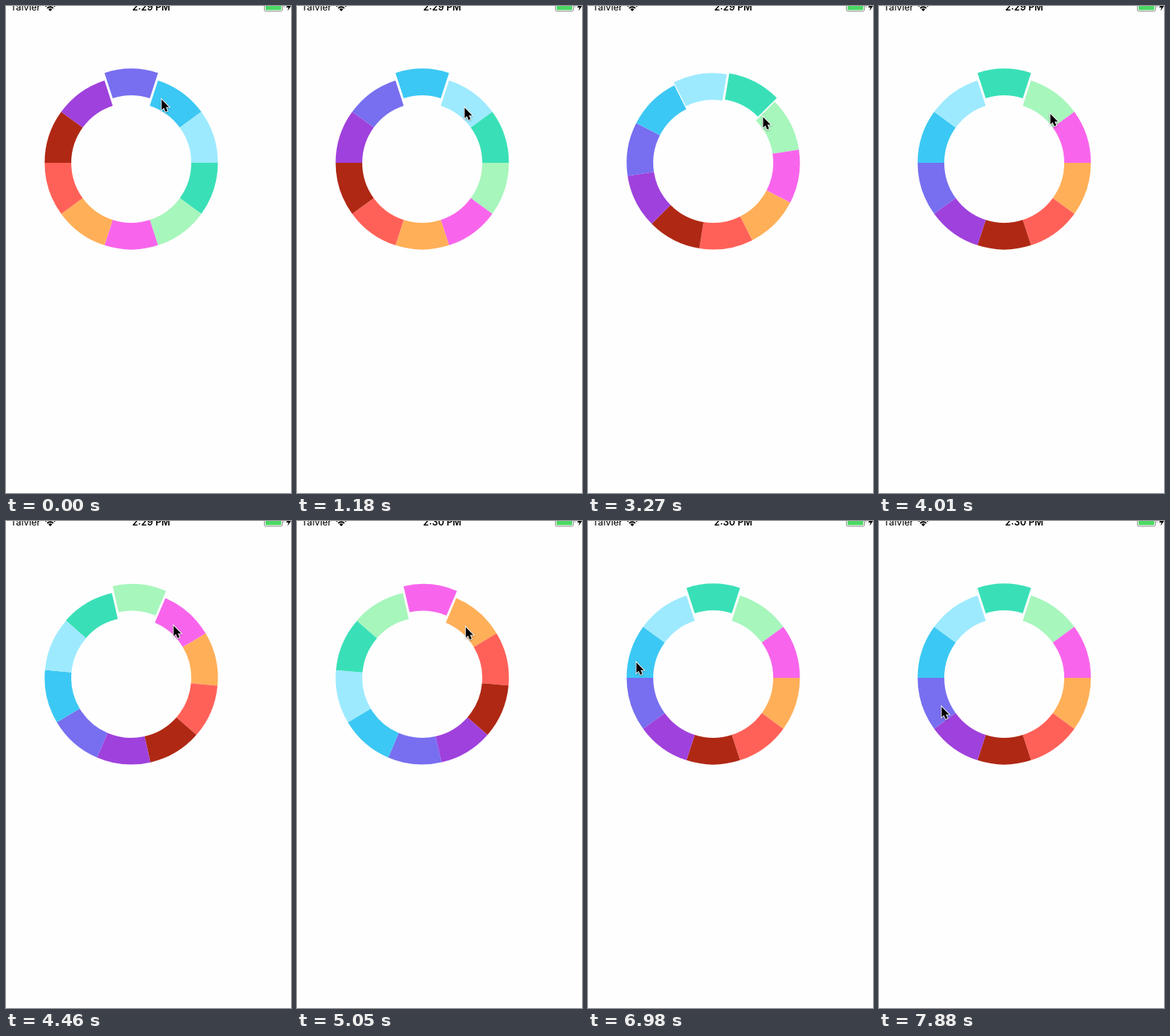
An HTML page for the animation above (8000 ms loop, 380 by 649 pixels).

```html
<!DOCTYPE html>
<html lang="en">
<head>
<meta charset="utf-8">
<title>Ring selector</title>
<style>
html, body { margin: 0; height: 100%; overflow: hidden; background: #fefefe; }
svg { display: block; width: 100vw; height: 100vh; }
text { font: 12.7px Inter, "Liberation Sans", sans-serif; fill: #000; }
#clock { font-weight: 600; font-size: 12.6px; text-anchor: middle; }
#cursor { filter: drop-shadow(0 1px 1px rgba(0, 0, 0, .3)); }
</style>
</head>
<body>
<svg viewBox="0 0 380 649">
  <text x="6" y="6">Talvier</text>
  <g transform="translate(59 7)" fill="none" stroke="#000" stroke-width="2">
    <path d="M-2.5 -2.5A3.6 3.6 0 0 1 2.5 -2.5L0 0Z" fill="#000" stroke="none"/>
    <path d="M-4 -4A5.7 5.7 0 0 1 4 -4M-6.5 -6.5A9.2 9.2 0 0 1 6.5 -6.5"/>
  </g>
  <text id="clock" x="193.6" y="6"></text>
  <rect x="344.5" y="-4.5" width="24" height="11.5" rx="2" fill="none" stroke="#8a8a8a"/>
  <rect x="346" y="-3" width="21" height="8.5" rx="1" fill="#4cd964"/>
  <path d="M370 -1q1.6 2 0 4z" fill="#8a8a8a"/>
  <path d="M378 -5L373.5 2H376.6L375.5 6.5L380 0H377.5Z"/>
  <g id="ring"></g>
  <path id="cursor" d="M0 0V14L3.1 11.2L5.3 16.4L7.9 15.3L5.7 10.2H10Z"
    stroke="#fff" stroke-width="1.8" paint-order="stroke"/>
</svg>
<script>
const LOOP = 8000, STEP = 148.6, TURN = 250, POP = 10;
const OUTER = 115.5, INNER = 80, SLICE = 36;
const colors = ['#776ff0', '#3cc8f4', '#9deaff', '#39e0b7', '#a7f6bc',
  '#f865ec', '#ffaf58', '#ff6158', '#af2814', '#9f41dc'];

// Taps: [ms, slice brought to the top]
const taps = [[465, 1], [1361, 2], [3184, 3], [4274, 4], [4868, 5], [6680, 3]];

// Pointer stops: [step, x, y]
const stops = [[0, 207, 124], [2, 217, 131], [6, 217, 131], [8, 223, 135],
  [12, 223, 135], [19, 233, 147.5], [26, 233, 147.5], [28, 223, 139],
  [30, 223, 139], [32, 224.5, 141], [34, 224.5, 141], [42, 64, 189],
  [43, 64, 188], [51, 64, 188], [53, 83, 247]];

const $ = id => document.getElementById(id);
const clamp = v => Math.min(1, Math.max(0, v));
const mix = (a, b, k) => a + (b - a) * k;

function bezier(x1, y1, x2, y2) {
  const at = (a, b, s) => 3 * a * s * (1 - s) ** 2 + 3 * b * s * s * (1 - s) + s ** 3;
  return x => {
    let lo = 0, hi = 1;
    for (let i = 0; i < 24; i++) {
      const mid = (lo + hi) / 2;
      if (at(x1, x2, mid) < x) lo = mid; else hi = mid;
    }
    return at(y1, y2, hi);
  };
}
const turnEase = bezier(.42, 0, .58, 1);
const popEase = bezier(.25, .1, .25, 1);

const sin = Math.sin(Math.PI / 10), cos = Math.cos(Math.PI / 10);
const point = (r, side) => `${side * r * sin} ${-r * cos}`;
const shape = `M${point(OUTER, -1)}A${OUTER} ${OUTER} 0 0 1 ${point(OUTER, 1)}` +
  `L${point(INNER, 1)}A${INNER} ${INNER} 0 0 0 ${point(INNER, -1)}Z`;

const slices = colors.map(fill => {
  const path = document.createElementNS('http://www.w3.org/2000/svg', 'path');
  path.setAttribute('d', shape);
  path.setAttribute('fill', fill);
  return $('ring').appendChild(path);
});

function drawRing(ms) {
  let from = 0, to = 0, start = -TURN;
  for (const [time, slice] of taps) {
    if (ms >= time) [from, to, start] = [to, slice, time];
  }
  const k = clamp((ms - start) / TURN);
  const top = mix(from, to, turnEase(k)), out = popEase(k);
  $('ring').setAttribute('transform', `translate(167 209) rotate(${-SLICE * top})`);
  slices.forEach((path, i) => {
    const pop = i === to ? out : i === from ? 1 - out : 0;
    path.setAttribute('transform', `rotate(${SLICE * i}) translate(0 ${-POP * pop})`);
  });
}

function drawCursor(step) {
  const next = Math.max(1, stops.findIndex(s => s[0] >= step));
  const [a, ax, ay] = stops[next - 1], [b, bx, by] = stops[next];
  const u = clamp((step - a) / (b - a)), k = u * u * (3 - 2 * u);
  $('cursor').setAttribute('transform',
    `translate(${mix(ax, bx, k) + .5} ${mix(ay, by, k) + .5})`);
}

// The motion is shown at a low, fixed frame rate.
function draw(now) {
  const step = Math.floor((now % LOOP + 9) / STEP);
  drawRing(step * STEP);
  drawCursor(step);
  $('clock').textContent = step < 32 ? '2:29 PM' : '2:30 PM';
}

const begin = performance.now();
function tick() {
  draw(performance.now() - begin);
  requestAnimationFrame(tick);
}
tick();
</script>
</body>
</html>
```
